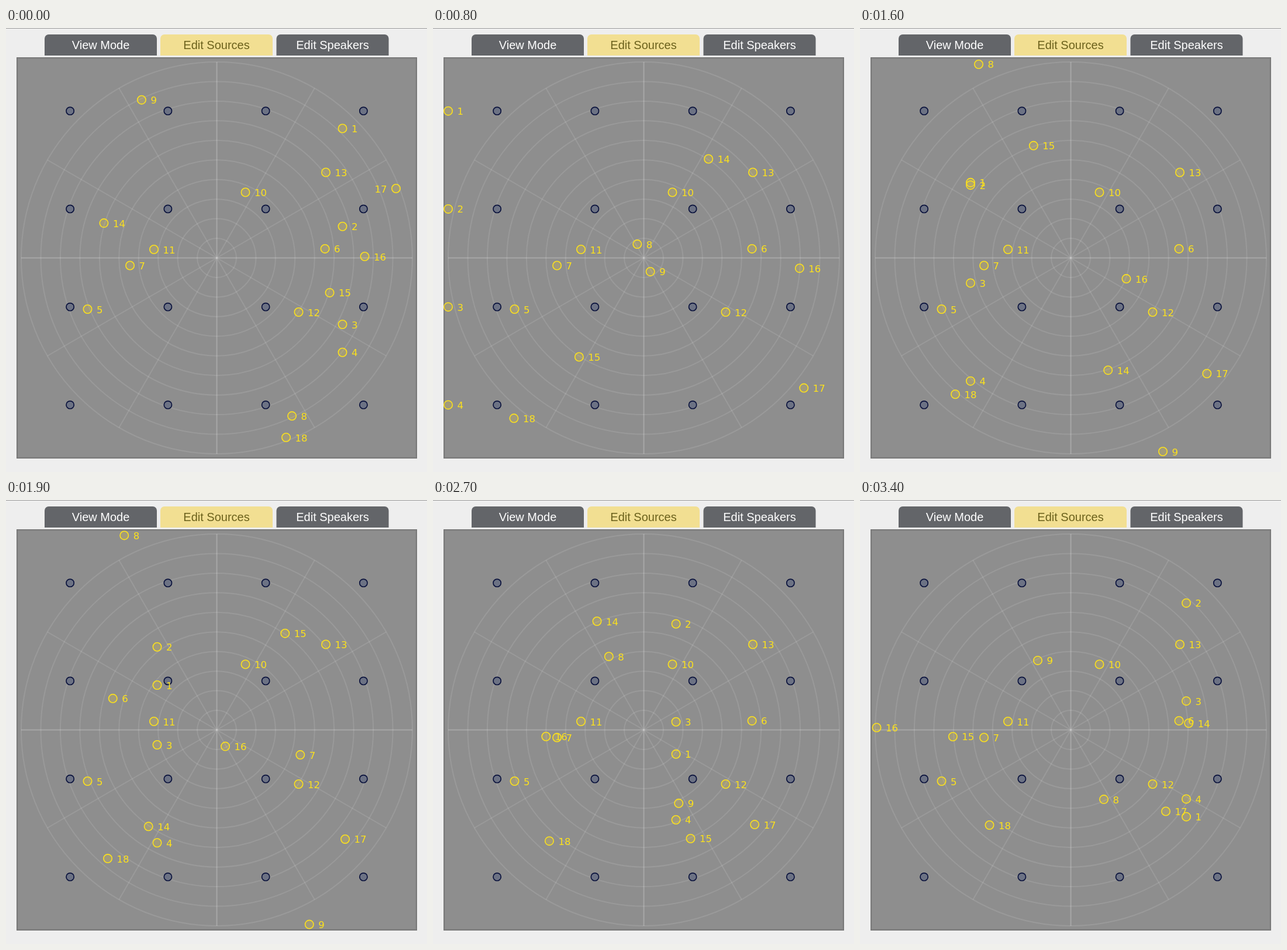
These frames come from a looping animation (720 px wide and 758 px high, 3.5 s). An HTML page with a canvas:

```html
<!DOCTYPE html>
<html lang="en">
<head>
<meta charset="utf-8">
<title>Source editor</title>
<style>
html, body { margin: 0; height: 100%; overflow: hidden; background: #eee; }
canvas { display: block; }
</style>
</head>
<body>
<canvas id="stage" width="720" height="758"></canvas>
<script>
const g = document.getElementById('stage').getContext('2d');
const CX = 360.5, CY = 392.5, R = 334.5, ROW = R / 2;
const STEP = 100, STEPS = 35, TURN = 2 * Math.PI, RAD = Math.PI / 180;
const YELLOW = '#fce11c';

// Key points: [when, value, ...], joined by straight lines.
const clock = [[0, 0], [4, 60], [13, 234], [19, 373], [24, 469], [34, 672.5]]; // the speed wavers
const swing = [[0, -2.48], [60, -2.096], [234, -.76], [445, .76], [672.5, 1.925]];
const zigzag = [[0, 253, -2.5], [69, 334, 5.5], [262, 143, 40], [672.5, -332, -4]];
const hook = [[0, 306.5, -118.5], [74, 292, 231], [234, 246, 208.5], [672.5, 162.5, 139]];
const spins = [2.69, 17.88, 29.01];
const still = { 5: [-221, 87.5], 10: [49, -112], 11: [-107.5, -14.5], 12: [140, 92.5], 13: [186.5, -146] };

const clamp = (v, lo, hi) => Math.min(hi, Math.max(lo, v));
const polar = (r, deg) => [r * Math.cos(deg * RAD), r * Math.sin(deg * RAD)];

function at(keys, t) {
  const i = Math.max(1, keys.findIndex(key => key[0] >= t));
  const a = keys[i - 1], b = keys[i], f = (t - a[0]) / (b[0] - a[0]);
  return a.slice(1).map((v, n) => v + (b[n + 1] - v) * f);
}

// Offsets from the centre, by source number.
function sources(step) {
  const pos = { ...still };
  const [t] = at(clock, step);

  // Four sources cross from left to right while changing rows, with a short stop at the edge.
  const u = (549.5 + t - clamp(t - 119.5, 0, 21)) / (2 * R), lap = Math.floor(u), f = u - lap;
  for (let i = 0; i < 4; i++) {
    const from = (i + 1 - lap) & 3, to = (from + 3) & 3;
    pos[i + 1] = [f * 2 * R - R, (from + (to - from) * f - 1.5) * ROW];
  }

  // Quick full turns with rests between them.
  const turned = 360 * spins.reduce((n, start) => n + clamp((step - start) / 2, 0, 1), 0);
  pos[6] = polar(185.7, turned - 4.8);
  pos[7] = polar(149, turned + 175);

  const reach = -378.8 * Math.cos(at(swing, t)[0]);
  pos[8] = polar(reach, 64.52);
  pos[9] = polar(-reach, 64.52);

  const orbit = 197.1 + .7727 * t;
  pos[14] = polar(202, orbit);
  pos[15] = polar(-202, orbit);

  pos[16] = at(zigzag, t);
  const [x, y] = pos[17] = at(hook, t);
  pos[18] = [-y, x];
  return pos;
}

function ring(x, y, r, stroke, width, fill) {
  g.beginPath();
  g.arc(x, y, r, 0, TURN);
  if (fill) { g.fillStyle = fill; g.fill(); }
  g.strokeStyle = stroke;
  g.lineWidth = width;
  g.stroke();
}

function tab(x, label, fill, ink) {
  g.fillStyle = fill;
  g.beginPath();
  g.roundRect(x, 11, 192, 36, [7, 7, 0, 0]);
  g.fill();
  g.fillStyle = ink;
  g.font = '20px "Liberation Sans", Arial, sans-serif';
  g.textAlign = 'center';
  g.fillText(label, x + 96, 36);
}

function panel() {
  g.fillStyle = '#8e8e8e';
  g.fillRect(18, 50, 685, 685);
  ['#727272', '#7f7f7f', '#888'].forEach((shade, i) => {
    g.strokeStyle = shade;
    g.lineWidth = 1;
    g.strokeRect(18.5 + i, 50.5 + i, 684 - 2 * i, 684 - 2 * i);
  });
}

function grid() {
  for (let n = 1; n <= 10; n++) ring(CX, CY, n * R / 10, 'rgba(255,255,255,.1)', 2);
  for (let a = 0; a < 180; a += 30) {
    const [x, y] = polar(R, a);
    g.strokeStyle = a % 90 ? 'rgba(255,255,255,.11)' : 'rgba(255,255,255,.22)';
    g.beginPath();
    g.moveTo(CX - x, CY - y);
    g.lineTo(CX + x, CY + y);
    g.stroke();
  }
}

function draw(step) {
  g.fillStyle = '#eee';
  g.fillRect(0, 0, 720, 758);
  g.fillStyle = '#999';
  g.fillRect(0, 0, 720, 1);
  tab(66, 'View Mode', '#636569', '#fff');
  tab(264, 'Edit Sources', '#f2df92', '#6b611c');
  tab(462.5, 'Edit Speakers', '#636569', '#fff');

  g.save();
  g.beginPath();
  g.rect(18, 50, 685, 685);
  g.clip();
  panel();
  grid();

  for (let i = 0; i < 16; i++) {
    ring(CX + (i % 4 - 1.5) * ROW, CY + ((i >> 2) - 1.5) * ROW, 6.6, '#0a123c', 1.7, '#6c7284');
  }

  g.font = '16.5px "DejaVu Sans", Verdana, sans-serif';
  for (const [name, [dx, dy]] of Object.entries(sources(step))) {
    const x = CX + dx, y = CY + dy, left = x > 660;
    ring(x, y, 7.2, YELLOW, 1.6, 'rgba(235,205,60,.22)');
    g.fillStyle = YELLOW;
    g.textAlign = left ? 'right' : 'left';
    g.fillText(name, x + (left ? -15.5 : 15.5), y + 6.5);
  }
  g.restore();
}

function tick() {
  draw(Math.floor(performance.now() / STEP) % STEPS);
  requestAnimationFrame(tick);
}
tick();
</script>
</body>
</html>
```
